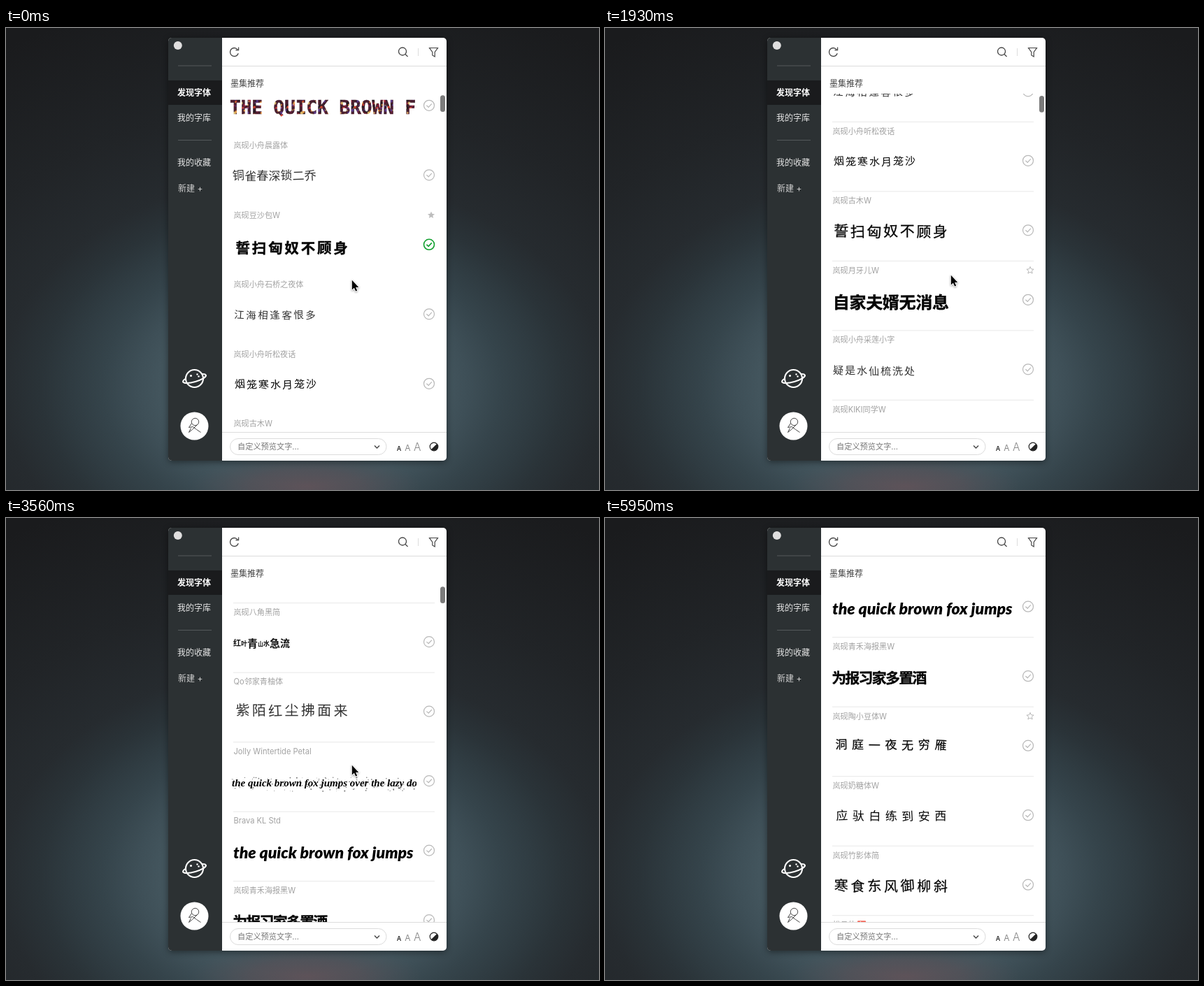
An HTML page with a canvas that plays this animation: 848x661 px, repeating every 6.39 s.

```html
<!DOCTYPE html>
<html lang="zh">
<head>
<meta charset="utf-8">
<style>
html, body { margin: 0; width: 100%; height: 100%; overflow: hidden; background: #1c1d1f; }
canvas { display: block; }
</style>
</head>
<body>
<canvas id="stage" width="848" height="661"></canvas>
<script>
const ctx = document.getElementById('stage').getContext('2d');
const TAU = Math.PI * 2;
const LOOP = 6390, STEP = 148.75, LAST = 40;
const PITCH = 99.5, FIRST = 68.8;
const UI = "Inter, 'Noto Sans CJK SC', 'Noto Sans CJK', sans-serif";
const SIDE = '#2c3133';

// label, sample, x, advance, size, weight, offset below label, extra stroke
const rows = [
  { name: '', draw: drawOrnate },
  row('岚砚小舟晨露体', '铜雀春深锁二乔', 324, 17.1, 17, 300, 44, 0),
  row('岚砚豆沙包W', '誓扫匈奴不顾身', 327, 23.3, 20.5, 900, 48.5, 0.4),
  row('岚砚小舟石桥之夜体', '江海相逢客恨多', 325, 17, 14.5, 300, 44.5, 0),
  row('岚砚小舟听松夜话', '烟笼寒水月笼沙', 326, 17, 15, 400, 44, 0),
  row('岚砚古木W', '誓扫匈奴不顾身', 326, 23.6, 21, 500, 45, 0.3),
  row('岚砚月牙儿W', '自家夫婿无消息', 326, 23.7, 24, 900, 47.5, 0.4),
  row('岚砚小舟采莲小字', '疑是水仙梳洗处', 325, 17, 15, 300, 45, 0),
  row('岚砚KIKI同学W', '忽如一夜春风来', 326, 23.6, 22, 700, 45, 0),
  row('溪桥晴朗体2016修订版', '满天风雨下西楼', 326, 23.7, 22.5, 700, 44.5, 0),
  { name: '岚砚八角黑简', draw: drawUneven },
  row('Qo邻家青柚体', '紫陌红尘拂面来', 327, 23.3, 20, 300, 42, 0),
  { name: 'Jolly Wintertide Petal', draw: drawSnowy },
  { name: 'Brava KL Std', draw: y =>
      text('the quick brown fox jumps', 325, y + 46, 'italic 900 23px Lato, sans-serif', '#000') },
  row('岚砚青禾海报黑W', '为报习家多置酒', 325, 19.2, 21, 900, 46, 0.3),
  row('岚砚陶小豆体W', '洞庭一夜无穷雁', 326, 23.7, 17, 500, 42, 0.2),
  row('岚砚奶糖体W', '应驮白练到安西', 327, 23.5, 17, 400, 44, 0),
  row('岚砚竹影体简', '寒食东风御柳斜', 326, 23.7, 20, 400, 45, 0.2),
  row('松月体', '', 326, 20, 20, 400, 45, 0)
];
const badges = { 9: 449, 18: 361 };

// start step, end step, from, to, ease-out power
const swipes = [
  [1, 8, 0, 165.5, 2],
  [8, 11, 165.5, 319, 1.4],
  [13, 17, 319, 629, 1.6],
  [19, 26, 629, 955.3, 2],
  [27, 32, 955.3, 1277.6, 3.6]
];
// step at which a row shows its hover star
const hovers = [[1, 3], [13, 6], [27, 12], [33, 15]];

function random(seed) {
  return () => (seed = (seed * 16807) % 2147483647) / 2147483647;
}

function row(name, sample, x, advance, size, weight, dy, fat) {
  return { name, draw: y => brush(sample, x, y + dy, advance, size, weight, fat) };
}

function text(str, x, y, font, color, align = 'left') {
  ctx.font = font;
  ctx.fillStyle = color;
  ctx.textAlign = align;
  ctx.textBaseline = 'middle';
  ctx.fillText(str, x, y);
}

function line(points, color, width = 1) {
  ctx.beginPath();
  points.forEach(([x, y], i) => i ? ctx.lineTo(x, y) : ctx.moveTo(x, y));
  ctx.strokeStyle = color;
  ctx.lineWidth = width;
  ctx.stroke();
}

function circle(x, y, r, fill, stroke, width = 1) {
  ctx.beginPath();
  ctx.arc(x, y, r, 0, TAU);
  if (fill) { ctx.fillStyle = fill; ctx.fill(); }
  if (stroke) { ctx.strokeStyle = stroke; ctx.lineWidth = width; ctx.stroke(); }
}

function box(x, y, w, h, r, fill, stroke) {
  ctx.beginPath();
  ctx.roundRect(x, y, w, h, r);
  if (fill) { ctx.fillStyle = fill; ctx.fill(); }
  if (stroke) { ctx.strokeStyle = stroke; ctx.lineWidth = 1; ctx.stroke(); }
}

// Sample glyphs with a slight hand-set wobble
function brush(str, x, y, advance, size, weight, fat) {
  const rnd = random(str.length * 97 + Math.round(size * 31) + weight);
  const wobble = weight > 600 ? 0.04 : 0.14;
  [...str].forEach((ch, i) => {
    ctx.save();
    ctx.translate(x + (i + 0.5) * advance, y + (rnd() - 0.5) * wobble * 10);
    ctx.rotate((rnd() - 0.5) * wobble);
    text(ch, 0, 0, `${weight} ${size}px ${UI}`, weight < 400 ? '#333' : '#050505', 'center');
    if (fat) {
      ctx.lineWidth = fat;
      ctx.lineJoin = 'round';
      ctx.strokeStyle = '#050505';
      ctx.strokeText(ch, 0, 0);
    }
    ctx.restore();
  });
}

function makeMosaic() {
  const tile = document.createElement('canvas');
  tile.width = tile.height = 48;
  const g = tile.getContext('2d');
  const colors = ['#d8452f', '#e8923a', '#5a3a8c', '#231a20', '#8f1f3c', '#231a20', '#d9b86a'];
  const rnd = random(41);
  g.fillStyle = '#4a2030';
  g.fillRect(0, 0, 48, 48);
  for (let i = 0; i < 190; i++) {
    g.fillStyle = colors[Math.floor(rnd() * colors.length)];
    g.beginPath();
    g.arc(rnd() * 48, rnd() * 48, 0.8 + rnd() * 1.4, 0, TAU);
    g.fill();
  }
  return ctx.createPattern(tile, 'repeat');
}
const mosaic = makeMosaic();

function drawOrnate(y) {
  const str = 'THE QUICK BROWN FOX';
  ctx.save();
  ctx.translate(320, y + 47);
  text(str, 0, 0, "bold 26px 'DejaVu Sans Mono', monospace", mosaic);
  ctx.strokeStyle = mosaic;
  ctx.lineWidth = 0.6;
  ctx.strokeText(str, 0, 0);
  ctx.restore();
}

function drawUneven(y) {
  const sizes = [11, 9, 15, 8, 9, 15, 14];
  let x = 325;
  [...'红叶青山水急流'].forEach((ch, i) => {
    text(ch, x, y + 45, `700 ${sizes[i]}px ${UI}`, '#111');
    x += sizes[i];
  });
}

function drawSnowy(y) {
  const rnd = random(77);
  for (let i = 0; i < 130; i++) {
    circle(323 + rnd() * 264, y + 37 + rnd() * 20, 0.4 + rnd() * 0.6, '#777');
  }
  text('the quick brown fox jumps over the lazy dog', 323, y + 46,
    "italic bold 15px 'Liberation Serif', serif", '#000');
}

function star(x, y, filled) {
  ctx.beginPath();
  for (let i = 0; i < 10; i++) {
    const r = i % 2 ? 2.4 : 5.3, a = i * TAU / 10 - TAU / 4;
    ctx.lineTo(x + r * Math.cos(a), y + r * Math.sin(a));
  }
  ctx.closePath();
  ctx.lineWidth = 0.9;
  ctx.strokeStyle = ctx.fillStyle = filled ? '#bdbdbd' : '#b0b0b0';
  filled ? ctx.fill() : ctx.stroke();
}

function check(x, y, on) {
  const color = on ? '#12a030' : '#b8b8b8', width = on ? 1.6 : 1.2;
  circle(x, y, 7.5, null, color, width);
  line([[x - 3.6, y], [x - 0.8, y + 2.6], [x + 3.8, y - 2.4]], color, width);
}

function ellipseGlow(x, y, rx, ry, stops) {
  ctx.save();
  ctx.translate(x, y);
  ctx.scale(rx, ry);
  const g = ctx.createRadialGradient(0, 0, 0, 0, 0, 1);
  stops.forEach(([at, color]) => g.addColorStop(at, color));
  ctx.fillStyle = g;
  ctx.fillRect(-4, -4, 8, 8);
  ctx.restore();
}

function drawBackdrop() {
  ellipseGlow(424, 512, 814, 570, [
    [0, '#465860'], [0.25, '#43555d'], [0.29, '#3e4f57'], [0.35, '#35444b'],
    [0.41, '#2f3b41'], [0.46, '#2a3338'], [0.53, '#262b2f'], [0.7, '#212427'], [1, '#1a1b1d']
  ]);
  ellipseGlow(430, 656, 165, 46, [[0, 'rgba(98,82,88,.85)'], [0.5, 'rgba(92,80,86,.55)'], [1, 'rgba(80,80,86,0)']]);
}

function drawSidebar() {
  ctx.fillStyle = SIDE;
  ctx.fillRect(232, 14, 77, 605);
  ctx.fillStyle = '#1a1b1d';
  ctx.fillRect(232, 75, 77, 35);
  circle(245.8, 25, 6, '#e0dfdf');
  for (const y of [54, 160.5]) line([[246, y], [294, y]], '#54595b');
  text('发现字体', 245, 93, `700 12px ${UI}`, '#fff');
  text('我的字库', 245, 129, `500 12px ${UI}`, '#e6e6e6');
  text('我的收藏', 245, 193.5, `500 12px ${UI}`, '#e6e6e6');
  text('新建 +', 246, 230, `400 12px ${UI}`, '#d0d0d0');
  drawPlanet(269.5, 501.5);
  drawAvatar(269.5, 569.5);
}

function drawPlanet(x, y) {
  const ring = (from, to) => {
    ctx.beginPath();
    ctx.ellipse(x, y, 17, 4.6, -0.28, from, to);
    ctx.strokeStyle = '#fff';
    ctx.lineWidth = 2;
    ctx.stroke();
  };
  ring(0, TAU);
  circle(x, y, 12.5, SIDE, '#fff', 2.1);
  ring(0, Math.PI);
  circle(x - 5, y - 4, 1.5, '#fff');
  circle(x + 4, y - 6, 1.2, '#fff');
  circle(x + 6, y - 3, 1.2, '#fff');
}

function drawAvatar(x, y) {
  circle(x, y, 20, '#fff');
  circle(x + 1, y - 6, 5.2, null, '#333', 0.9);
  line([[x - 4, y - 4], [x - 8, y + 2], [x - 2, y + 1], [x + 3, y + 5], [x + 9, y + 9]], '#333', 0.9);
  line([[x + 4, y - 2], [x - 3, y + 5], [x - 8, y + 9], [x - 5, y + 3]], '#333', 0.9);
}

function drawChrome() {
  const ink = '#444';
  for (const y of [54.5, 578.5]) line([[309, y], [630, y]], '#dcdcdc');

  // refresh
  ctx.beginPath();
  ctx.arc(326.5, 34.5, 6, 0.3, TAU - 0.65);
  ctx.strokeStyle = ink;
  ctx.lineWidth = 1.3;
  ctx.stroke();
  line([[332.6, 27.5], [332.6, 31.6], [328.5, 31.6]], ink, 1.2);

  // search
  circle(567, 33.5, 5.5, null, ink, 1.3);
  line([[571, 37.5], [574.5, 41]], ink, 1.3);
  line([[589.5, 29], [589.5, 40]], '#ddd');

  // filter
  line([[605.5, 28.5], [617.5, 28.5], [613.2, 34.5], [613.2, 41], [609.8, 39], [609.8, 34.5], [605.5, 28.5], [607, 28.5]], ink, 1.2);

  text('墨集推荐', 321, 80, `500 12px ${UI}`, '#444');

  box(320.5, 587.5, 223.5, 23, 11.5, '#fff', '#dcdcdc');
  text('自定义预览文字...', 331, 600, `400 11.2px ${UI}`, '#777');
  line([[527, 597.5], [530.5, 601], [534, 597.5]], '#444', 1.4);
  ctx.textBaseline = 'alphabetic';
  [[562, 9, 600, '#333'], [574.3, 12, 400, '#888'], [588.3, 15.5, 300, '#888']].forEach(([x, size, weight, color]) => {
    ctx.font = `${weight} ${size}px ${UI}`;
    ctx.textAlign = 'center';
    ctx.fillStyle = color;
    ctx.fillText('A', x, 605);
  });

  // contrast
  circle(612, 599, 5.8, '#fff', '#222', 1.2);
  ctx.beginPath();
  ctx.arc(612, 599, 5.8, -TAU / 8, TAU * 3 / 8);
  ctx.fillStyle = '#222';
  ctx.fill();
}

function drawRow(item, k, y, hover, ruled) {
  if (ruled) line([[325, y - 13.5], [613, y - 13.5]], '#e8e8e8');
  text(item.name, 325.5, y + 0.5, `400 11.1px ${UI}`, '#a2a2a2');
  if (badges[k]) {
    box(badges[k], y - 6, 12, 12, 1, '#f4675a');
    text('免', badges[k] + 6, y + 0.5, `500 10px ${UI}`, '#fff', 'center');
  }
  if (k === 2 || k === hover) star(608, y, k === 2);
  check(605, y + 42, k === 2);
  ctx.save();
  ctx.beginPath();
  ctx.rect(318, 94, 269, 484);
  ctx.clip();
  item.draw(y);
  ctx.restore();
}

function drawList(n, scroll) {
  let hover = -1;
  for (const [at, k] of hovers) if (n >= at) hover = k;
  ctx.save();
  ctx.beginPath();
  ctx.rect(309, 94, 321, 484);
  ctx.clip();
  rows.forEach((item, k) => {
    const y = FIRST + k * PITCH - scroll;
    if (y > 10 && y < 600) drawRow(item, k, y, hover, n > 0);
  });
  ctx.restore();
}

// The pointer settles at first, then speeds off the window and disappears
function drawCursor(n) {
  if (n > 35) return;
  const away = Math.pow(Math.max(0, (n - 33) / 2), 2.35);
  const settle = Math.max(0, 2 - n) * 3.5;
  ctx.save();
  ctx.translate(494.8 + 218 * away, 353.8 + 256 * away + settle);
  ctx.scale(0.88, 0.92);
  ctx.beginPath();
  [[0, 0], [0, 15], [3.5, 11.8], [6, 17.2], [8.4, 16.2], [6, 11], [10.8, 11]].forEach(p => ctx.lineTo(...p));
  ctx.closePath();
  ctx.lineJoin = 'round';
  ctx.shadowColor = 'rgba(0,0,0,.4)';
  ctx.shadowBlur = 3;
  ctx.shadowOffsetY = 1;
  ctx.strokeStyle = '#fff';
  ctx.lineWidth = 1.8;
  ctx.stroke();
  ctx.shadowColor = 'transparent';
  ctx.fillStyle = '#000';
  ctx.fill();
  ctx.restore();
}

function scrollAt(n) {
  let pos = 0;
  for (const [start, end, from, to, power] of swipes) {
    if (n <= start) break;
    const u = Math.min(1, (n - start) / (end - start));
    pos = from + (to - from) * (1 - Math.pow(1 - u, power));
  }
  return pos;
}

function render(n) {
  const scroll = scrollAt(n);
  drawBackdrop();

  ctx.save();
  ctx.shadowColor = 'rgba(0,0,0,.45)';
  ctx.shadowBlur = 10;
  ctx.shadowOffsetY = 2;
  box(232, 14, 398, 605, 5, '#fff');
  ctx.restore();

  ctx.save();
  ctx.beginPath();
  ctx.roundRect(232, 14, 398, 605, 5);
  ctx.clip();
  drawSidebar();
  drawChrome();
  drawList(n, scroll);
  ctx.globalAlpha = n >= LAST ? 0 : n === LAST - 1 ? 0.5 : 1;
  box(621, 96.3 + scroll * 0.0022, 7, 23.7, 3.5, '#7b7b7b');
  ctx.restore();

  drawCursor(n);
}

let shown = -1;
function tick() {
  const t = performance.now() % LOOP;
  const n = Math.min(LAST, Math.floor((t + 13) / STEP));
  if (n !== shown) render(shown = n);
  requestAnimationFrame(tick);
}
tick();
</script>
</body>
</html>
```
